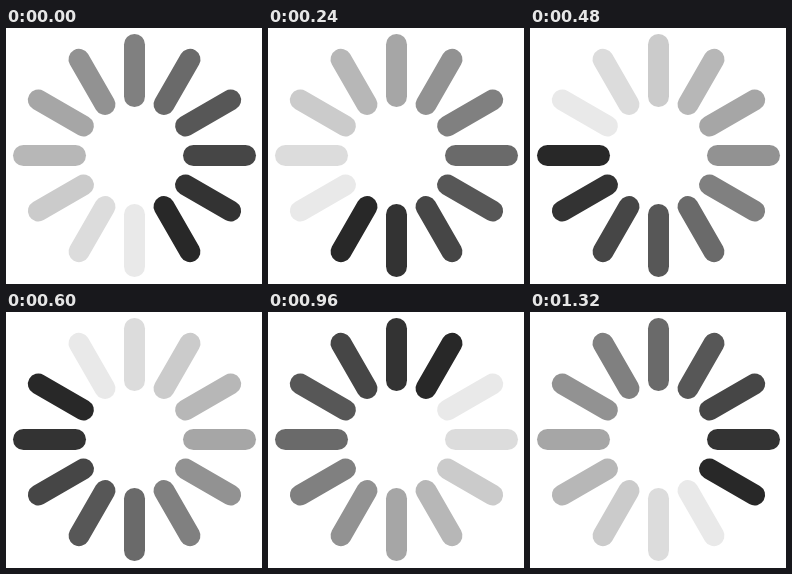
An HTML page that plays this animation: 256 px wide and 256 px high, repeating every 1440 ms.

```html
<!DOCTYPE html>
<html lang="en">
<head>
<meta charset="utf-8">
<title>Spinner</title>
<style>
  html, body { margin: 0; height: 100%; overflow: hidden; background: #fff; }
  svg { display: block; width: 100%; height: 100%; }
  line { stroke-width: 21; stroke-linecap: round; }
</style>
</head>
<body>
<svg viewBox="0 0 256 256"><g id="spokes" transform="translate(128.5 127.5)"></g></svg>
<script>
  const COUNT = 12, STEP = 120, FIRST = 5;
  // Grey level by how many steps ago a spoke was lit
  const greys = [40, 51, 70, 87, 106, 128, 146, 166, 183, 203, 220, 233];
  const group = document.getElementById('spokes');

  const spokes = greys.map((_, i) => {
    const line = document.createElementNS('http://www.w3.org/2000/svg', 'line');
    line.setAttribute('y1', -59);
    line.setAttribute('y2', -111);
    line.setAttribute('transform', `rotate(${i * 360 / COUNT})`);
    return group.appendChild(line);
  });

  function draw(time) {
    const head = FIRST + Math.floor(time / STEP) % COUNT;
    spokes.forEach((spoke, i) => {
      const grey = greys[(head - i + COUNT) % COUNT];
      spoke.setAttribute('stroke', `rgb(${grey},${grey},${grey})`);
    });
  }

  const start = performance.now();
  function tick() {
    draw(performance.now() - start);
    requestAnimationFrame(tick);
  }
  tick();
</script>
</body>
</html>
```
